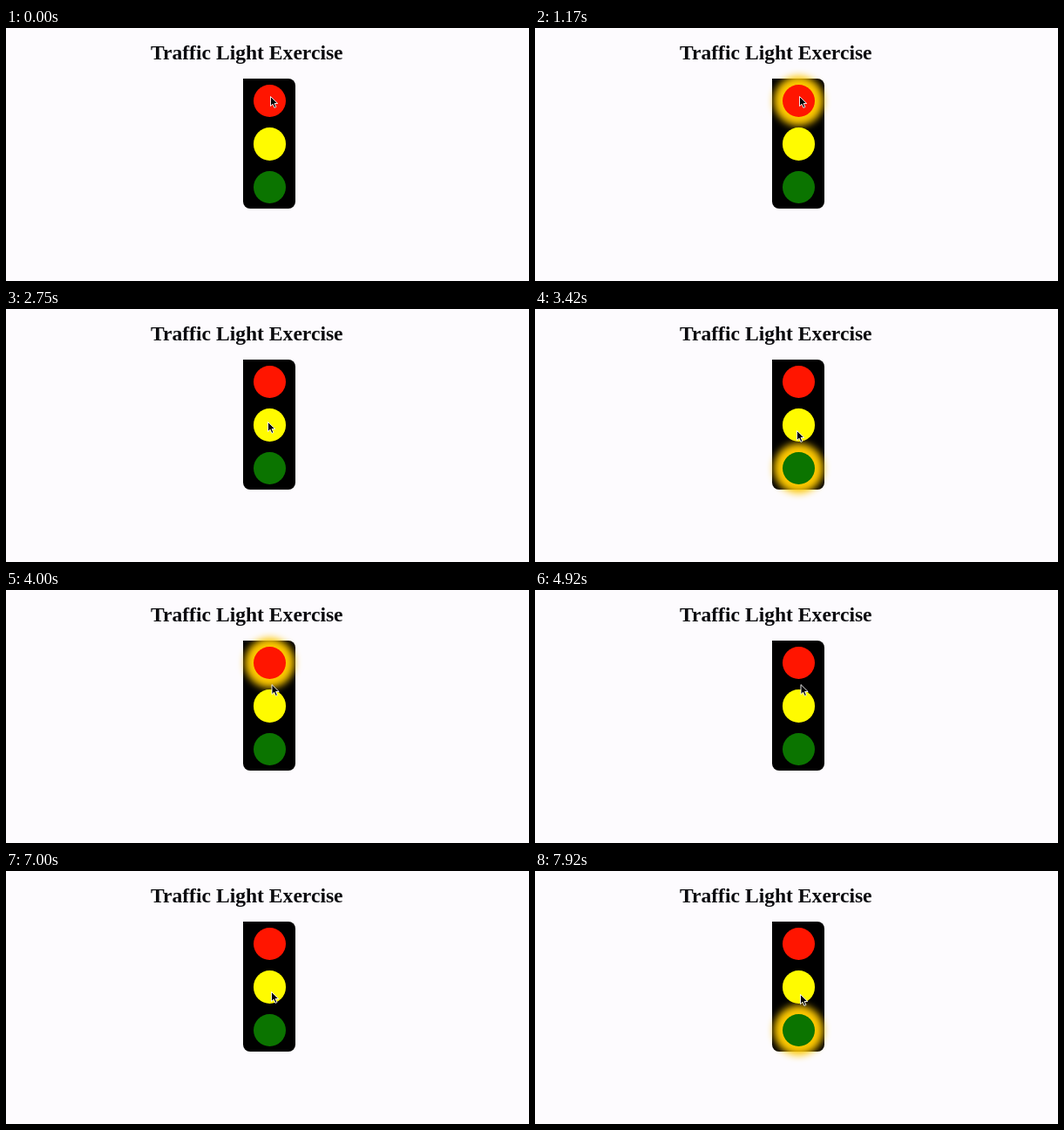
Recreate the animation shown at these times as an HTML page. Size 600 by 290 pixels, loop 8000 ms.

```html
<!DOCTYPE html>
<html lang="en">
<head>
<meta charset="utf-8">
<title>Traffic Light Exercise</title>
<style>
html, body { margin: 0; width: 100%; height: 100%; overflow: hidden; background: #fdfbfe; }
h1 {
  position: absolute; left: 166px; top: 15px; margin: 0;
  font: bold 23.6px/27px "Liberation Serif", Times, serif;
  color: #0b0b0f; white-space: nowrap;
}
#box {
  position: absolute; left: 272px; top: 58px; width: 60px; height: 149.4px;
  background: #000; border-radius: 0 8px 8px 8px;
}
.lamp { position: absolute; left: 11.5px; width: 37.4px; height: 37.4px; border-radius: 50%; }
.on { box-shadow: 0 0 9px 10px #fdc800; }
#red { top: 6.5px; background: #ff1500; }
#yellow { top: 56.2px; background: #fffb00; }
#green { top: 105.9px; background: #0b7400; }
#cursor { position: absolute; left: -.7px; top: -.6px; overflow: visible; }
</style>
</head>
<body>
<h1>Traffic Light Exercise</h1>
<div id="box">
  <div class="lamp" id="red"></div>
  <div class="lamp" id="yellow"></div>
  <div class="lamp" id="green"></div>
</div>
<svg id="cursor" width="12" height="16">
  <path d="M.5 .5V11.6L3.1 9.2 4.9 13.4 6.9 12.5 5.1 8.5H8.7Z" fill="#000" stroke="#fff" stroke-width=".9"/>
</svg>
<script>
const LOOP = 8000, FPS = 12;

// Each pass lights the lamps from the top down, one every `step` ms.
const passes = [
  { start: 1080, step: 870, hold: 700, count: 4 },
  { start: 5570, step: 1000, hold: 400, count: 3 }
];

// The pointer rests at each stop, then glides for GLIDE ms to arrive at `at`.
const GLIDE = 400;
const stops = [
  { at: 0, x: 304, y: 79 },
  { at: 1950, x: 301, y: 130 },
  { at: 3400, x: 301, y: 140 },
  { at: 4000, x: 305.5, y: 109 },
  { at: 5330, x: 310.5, y: 76 },
  { at: 6950, x: 305, y: 139 },
  { at: 7900, x: 305, y: 142 }
];

const lamps = [...document.querySelectorAll(".lamp")];
const cursor = document.getElementById("cursor");
const ease = u => u * u * (3 - 2 * u);

function litLamp(t) {
  for (const { start, step, hold, count } of passes) {
    const k = Math.floor((t - start) / step);
    if (k >= 0 && k < count && t - start - k * step < hold) return k % lamps.length;
  }
  return -1;
}

function pointerAt(t) {
  let { x, y } = stops[0];
  for (const s of stops.slice(1)) {
    const e = ease(Math.min(1, Math.max(0, 1 + (t - s.at) / GLIDE)));
    x += (s.x - x) * e;
    y += (s.y - y) * e;
  }
  return [x, y];
}

function draw(now) {
  const t = Math.floor((now % LOOP) * FPS / 1000) * 1000 / FPS;
  const lit = litLamp(t);
  lamps.forEach((lamp, i) => lamp.classList.toggle("on", i === lit));
  const [x, y] = pointerAt(t);
  cursor.style.transform = `translate(${x}px, ${y}px)`;
}

const start = performance.now();
function tick() {
  draw(performance.now() - start);
  requestAnimationFrame(tick);
}
tick();
</script>
</body>
</html>
```
